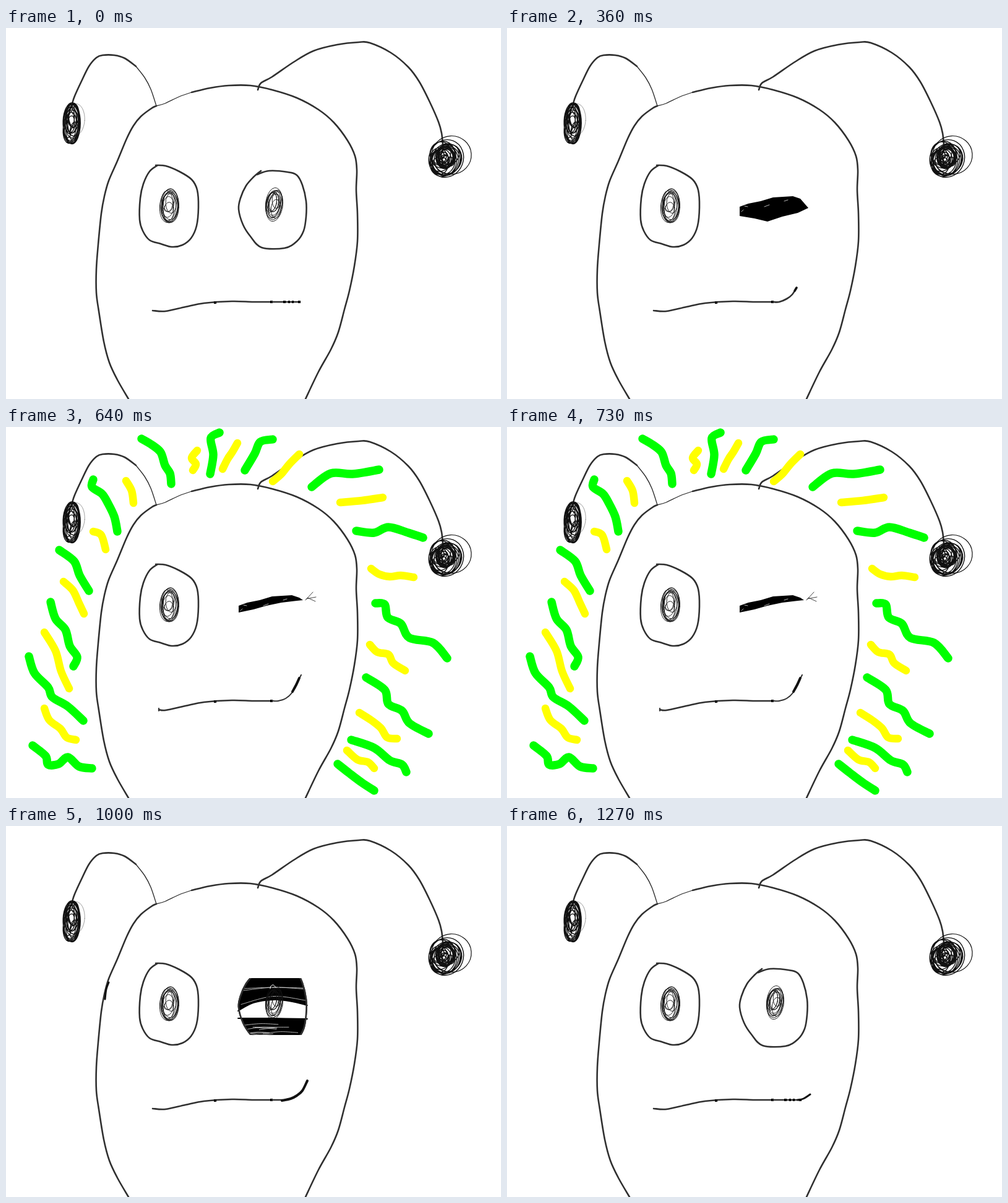
Recreate the animation shown at these times as an HTML page with a canvas. Size 800 by 600 pixels, loop 1360 ms.

```html
<!DOCTYPE html>
<html lang="en">
<head>
<meta charset="utf-8">
<title>Winking alien</title>
<style>
html, body { margin: 0; width: 100%; height: 100%; overflow: hidden; background: #fff; }
canvas { display: block; }
</style>
</head>
<body>
<canvas id="stage" width="800" height="600"></canvas>
<script>
const ctx = document.getElementById('stage').getContext('2d');
const INK = '#303030';

// Smooth curve through a flat list of x, y pairs
function curve(p) {
  const path = new Path2D(), n = p.length / 2;
  const at = i => { i = Math.max(0, Math.min(n - 1, i)); return [p[2 * i], p[2 * i + 1]]; };
  path.moveTo(p[0], p[1]);
  for (let i = 0; i < n - 1; i++) {
    const [a, b, c, d] = [at(i - 1), at(i), at(i + 1), at(i + 2)];
    path.bezierCurveTo(b[0] + (c[0] - a[0]) / 6, b[1] + (c[1] - a[1]) / 6,
      c[0] - (d[0] - b[0]) / 6, c[1] - (d[1] - b[1]) / 6, c[0], c[1]);
  }
  return path;
}

function stroke(path, width = 2.6, color = INK) {
  ctx.lineWidth = width;
  ctx.strokeStyle = color;
  ctx.stroke(path);
}

function fill(path, color = '#000') {
  ctx.fillStyle = color;
  ctx.fill(path);
}

function seeded(seed) {
  return () => (seed = (seed * 16807) % 2147483647) / 2147483647;
}

// Pen loops with radii between inner and 1 times rx, ry
function scribble(cx, cy, rx, ry, loops, inner, tilt, width, seed) {
  const rnd = seeded(seed), path = new Path2D();
  for (let i = 0; i < loops; i++) {
    const k = inner + (1 - inner) * rnd(), slack = 1.05 - k;
    const x = cx + (rnd() - .5) * rx * slack * 1.5, y = cy + (rnd() - .5) * ry * slack * 1.5;
    const turn = tilt + (rnd() - .5) * .2;
    path.moveTo(x + rx * k * Math.cos(turn), y + rx * k * Math.sin(turn));
    path.ellipse(x, y, rx * k, ry * k, turn, 0, 7);
  }
  stroke(path, width, '#111');
}

const head = curve([198,600, 180,569, 167,541, 158,507, 150,458, 146,428, 146,390, 149,350, 154,300, 159,272,
  166,247, 180,215, 195,179, 206,158, 218,143, 235,130, 243,126]);
const brow = curve([243,126, 257,122, 280,111, 300,104]);
const skull = curve([300,104, 330,97, 360,93, 395,93, 430,100, 470,113, 505,132, 530,153, 552,182, 564,207,
  567,230, 566,262, 568,300, 568,345, 563,385, 555,425, 547,455, 537,492, 525,520, 505,556, 484,600]);
const leftFeeler = curve([107,122, 111,110, 122,86, 134,62, 146,48, 156,44, 175,44, 192,49, 210,62]);
const leftRoot = curve([210,62, 224,80, 234,99, 243,126]);
const rightFeeler = curve([407,100, 412,89, 430,79, 465,55, 497,37, 535,27, 570,23, 588,24, 622,40, 650,63,
  668,87, 685,120, 699,152, 704,170, 706,190]);
const leftEye = curve([242,222, 258,223, 280,232, 300,245, 309,262, 311,290, 308,320, 299,340, 285,351, 268,354,
  250,349, 232,343, 221,328, 216,310, 217,275, 222,252, 232,232, 245,222]);
const rightEye = curve([406,237, 425,231, 455,233, 470,238, 479,254, 485,280, 485,305, 481,328, 470,345, 450,356,
  413,355, 395,337, 383,318, 376,293, 379,275, 388,255, 400,241, 412,231]);

const greenRays = [
  [219,19, 236,29, 250,41, 257,62, 265,75, 267,92], [141,85, 139,97, 155,108, 164,122, 175,145, 180,169],
  [345,9, 331,18, 335,45, 330,76], [431,20, 411,24, 402,43, 386,70], [86,199, 110,217, 119,240, 134,265],
  [72,283, 80,310, 96,328, 103,354, 115,372, 109,387], [37,371, 46,398, 68,421, 75,437, 100,452, 125,475],
  [43,515, 64,532, 68,546, 85,545, 100,534, 118,549, 139,552]
].concat([
  [494,97, 525,75, 560,76, 603,69], [566,168, 595,171, 618,162, 650,171, 674,179],
  [597,285, 612,287, 617,308, 638,318, 652,341, 690,349, 713,374],
  [582,405, 612,425, 618,448, 640,459, 652,479, 683,496],
  [558,506, 595,519, 620,539, 640,546, 647,558], [536,545, 555,560, 575,575, 595,588]
]).map(curve);
const yellowRays = [
  [309,38, 300,50, 307,60, 302,70], [374,26, 366,40, 358,52, 350,68], [474,44, 458,60, 445,76, 431,88],
  [194,87, 203,103, 206,123], [141,169, 154,175, 161,198], [93,250, 108,264, 118,285, 126,302],
  [62,332, 80,362, 89,395, 102,423], [62,455, 70,474, 88,488, 98,502, 113,506],
  [540,122, 575,119, 609,114], [590,229, 603,238, 620,242, 638,240, 659,243],
  [588,352, 600,364, 618,368, 626,382, 645,394], [571,462, 590,474, 606,487, 616,502, 632,504],
  [551,523, 568,538, 585,542, 595,552]
].map(curve);

function drawBody() {
  for (const p of [head, skull, leftFeeler, rightFeeler]) stroke(p);
  stroke(brow, 1.3);
  stroke(leftRoot, 1.4);
  scribble(106, 154, 14, 33, 20, .35, .06, 1.2, 11);
  scribble(112, 148, 15, 26, 1, 1, .1, .4, 5);
  scribble(711, 211, 28, 31, 13, .45, .4, 1.4, 23);
  scribble(711, 208, 16, 20, 12, .3, .2, 1.7, 31);
  scribble(719, 206, 32, 31, 1, 1, 0, 1.2, 7);
  stroke(leftEye);
  scribble(264, 287, 15, 28, 12, .55, .02, .9, 41);
}

function drawRightPupil() {
  scribble(433, 286, 14, 27, 12, .55, .14, .9, 53);
}

// Heights: top edge, upper lid (left, middle, right), lower lid (left, middle, right), bottom edge
const LIDS = {
  1: [234, 262, 250, 256, 335, 337, 335, 351],
  2: [238, 285, 264, 273, 321, 322, 319, 345],
  3: [250, 297, 284, 291, 308, 309, 309, 333],
  11: [246, 299, 281, 290, 311, 311, 312, 338],
  12: [240, 285, 266, 274, 321, 322, 319, 345],
  13: [234, 262, 250, 256, 335, 337, 335, 351]
};

function drawLids([top, ul, um, ur, ll, lm, lr, bottom]) {
  const upper = curve([375,ul, 400,(ul + um) / 2 - 4, 432,um, 460,(um + ur) / 2 - 2, 487,ur]);
  const lower = curve([487,lr, 432,lm, 375,ll]);
  const gap = new Path2D(upper);
  gap.lineTo(487, lr);
  gap.lineTo(432, lm);
  gap.lineTo(375, ll);
  ctx.save();
  ctx.beginPath();
  ctx.rect(370, top, 122, bottom - top);
  ctx.clip();
  stroke(rightEye);
  ctx.save();
  ctx.clip(rightEye);
  fill(rightEye);
  const rnd = seeded(top);
  const streak = (x, y, length, rise) =>
    stroke(curve([x,y, x + length / 2,y - rise, x + length,y - rise / 2]), .8, '#ddd');
  streak(384, top + 20, 96, 5);
  streak(382, top + 17, 98, 2);
  streak(380, (top + ul) / 2 + 16, 104, 13);
  for (let i = 0; i < 9; i++) streak(384 + rnd() * 45, ll + 3 + rnd() * (bottom - ll - 4), 25 + rnd() * 35, rnd() * 8 - 4);
  fill(gap, '#fff');
  ctx.restore();
  stroke(upper, 1.8, '#000');
  stroke(lower, 1.8, '#000');
  stroke(rightEye);
  drawRightPupil();
  if (um > 258) stroke(curve([427,263, 428,259, 432,257, 436,261]), 1, '#fff');
  ctx.restore();
}

// Closed eye; open goes from 0 (a thin line) to 1 (a thick lens)
function drawSlit(open) {
  const mix = (a, b) => a + (b - a) * open;
  fill(new Path2D(`M376 289 L390 284 L410 280 L430 274 L462 272 L474 276 L${mix(480, 487)} ${mix(280, 291)}
    L470 ${mix(281, 299)} L445 ${mix(284, 305)} L421 ${mix(289, 313)} L400 ${mix(295, 308)} L376 ${mix(300, 304)}Z`));
  stroke(new Path2D('M379 297l3-3M384 288l5 1M416 289l8-3M448 280l6-2'), .7, '#fff');
  if (!open) stroke(new Path2D('M484 280L496 267M485 278L501 275M487 276L500 282'), 1, '#444');
}

function drawMouth(k) {
  const smiling = k >= 4 && k <= 9, wide = k >= 6 && k <= 9;
  const flat = [258,458, 290,451, 320,445, 365,442, 400,443, 430,443];
  stroke(curve([wide ? 247 : 237, wide ? 457 : 457, ...flat]));
  fill(new Path2D('M336 442h4v4h-4zM427 441h4v4h-4z'));
  if (wide) {
    stroke(curve([430,443, 440,443, 452,439, 462,430, 470,415, 477,401]), 2);
    stroke(curve([463,428, 469,417, 474,406]), 4, '#111');
    stroke(new Path2D('M247 455v4'), 2);
  } else if (smiling) {
    const lift = k === 5 ? 9 : 0;
    stroke(curve([430,443, 440,443, 452,438, 461,431, 468 + lift / 2,420 - lift]));
    stroke(new Path2D(`M${465 + lift / 2} ${425 - lift}l3 -5`), 3.5, '#111');
  } else if (k === 10 || k === 11) {
    stroke(curve([430,443, 446,443]));
    stroke(curve([446,444, 460,441, 470,436, 479,428, 487,412]), 4, '#111');
  } else {
    stroke(curve([430,443, 475,443]));
    fill(new Path2D('M448 441h4v4h-4zM456 441h3v4h-3zM462 441h3v4h-3zM472 441h4v4h-4z'));
    if (k >= 12) {
      const tip = { 12: 421, 13: 428, 14: 434 }[k];
      stroke(curve([470,443, 479,441, 490,tip]), 3, '#111');
    }
  }
}

function drawScene(k) {
  ctx.fillStyle = '#fff';
  ctx.fillRect(0, 0, 800, 600);
  drawBody();
  if (LIDS[k]) {
    drawLids(LIDS[k]);
  } else if (k === 0 || k === 14) {
    stroke(rightEye);
    drawRightPupil();
  } else {
    drawSlit({ 4: 1, 5: .5, 10: 1 }[k] || 0);
  }
  drawMouth(k);
  if (k === 11) stroke(curve([166,253, 162,264, 160,280]), 3, '#111');
  if (k >= 6 && k <= 8) {
    for (const ray of greenRays) stroke(ray, 13.5, '#00ff00');
    for (const ray of yellowRays) stroke(ray, 12.5, '#ffff00');
  }
}

ctx.lineCap = ctx.lineJoin = 'round';
let shown = -1;
const start = performance.now();
function tick() {
  const t = (performance.now() - start) % 1360;
  const k = t < 550 ? Math.min(5, Math.floor(t / 90)) : Math.floor((t - 10) / 90);
  if (k !== shown) drawScene(shown = k);
  requestAnimationFrame(tick);
}
tick();
</script>
</body>
</html>
```
